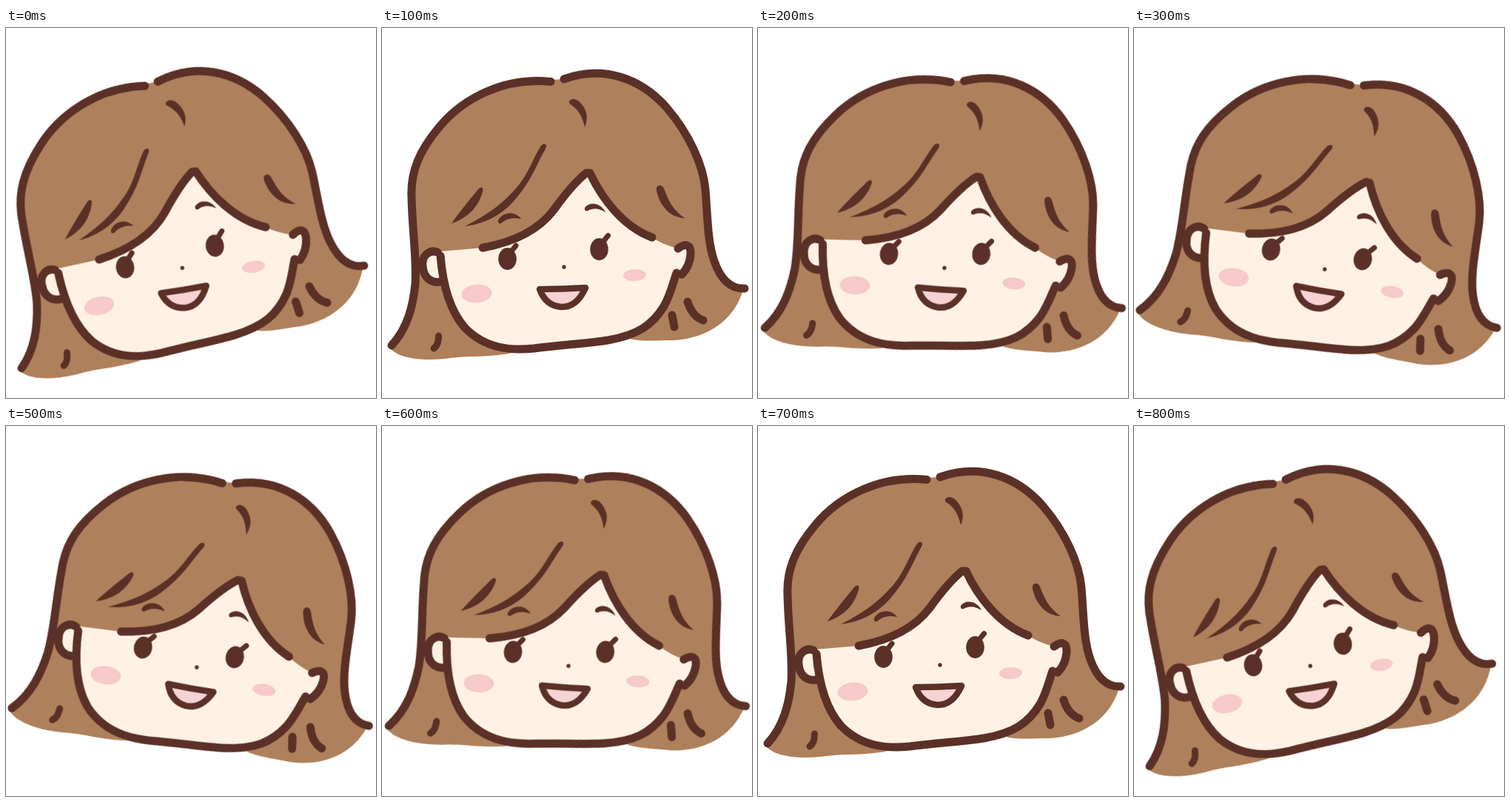
An HTML page that plays this animation: 500x500 px, repeating every 0.9 s.

```html
<!DOCTYPE html>
<html lang="en">
<head>
<meta charset="utf-8">
<title>Swaying head</title>
<style>
  html, body { margin: 0; width: 100%; height: 100%; overflow: hidden; background: #fff; }
  svg { display: block; width: 100%; height: 100%; }
  #head { transform-origin: 0 0; }
  .hair { fill: #ae805b; }
  .skin { fill: #fff2e4; }
  .blush { fill: #f7c9c8; }
  .ink { fill: #5b3027; }
  .line { fill: none; stroke: #5b3027; stroke-width: 11; stroke-linecap: round; stroke-linejoin: round; }
  .lash { stroke-width: 7; }
  .mouth { fill: #f6d2d4; stroke-width: 8.5; }
</style>
</head>
<body>
<svg viewBox="0 0 500 500">
  <g id="head">
    <path class="hair" d="M228,70 C165,66 110,95 78,133 C50,166 38,195 40,230 C41,275 47,310 45,345
      C42,375 35,405 10,432 C22,446 50,450 85,447 C115,442 150,446 180,438 L200,420 L300,400 L335,420
      C350,424 370,422 395,422 C440,419 476,395 488,354 C468,353 456,335 449,315
      C440,290 440,255 437,218 C434,185 415,143 385,108 C350,68 300,50 246,69 Z"/>

    <!-- ears and face -->
    <path class="skin" d="M77,303 C65,299 53,307 55,322 C56,337 66,345 80,343 Z"/>
    <path class="skin" d="M396,298 C411,290 418,293 417,306 C416,320 410,328 405,333 L394,333 Z"/>
    <path class="skin" d="M77,302 L136,297 C175,290 210,275 232,246 C245,228 262,207 276,196 L282,197
      C297,230 325,268 365,283 Q380,293 400,298 L398,331 C393,345 390,360 381,376 C365,402 345,415 305,422
      C280,426 245,428 205,433 C175,436 140,434 112,405 C90,380 82,345 79,308 Z"/>
    <ellipse class="blush" cx="128" cy="359" rx="20.5" ry="12.3" transform="rotate(-5 128 359)"/>
    <ellipse class="blush" cx="341.5" cy="334" rx="15.5" ry="8" transform="rotate(-2 341.5 334)"/>

    <!-- outlines -->
    <path class="line" d="M228,72.5 C165,66 110,95 78,133 C50,166 38,195 40,230 C41,275 47,310 45,345
      C42,375 35,405 13,429"/>
    <path class="line" d="M246,69 C300,50 350,68 385,108 C415,143 434,185 437,218 C440,255 440,290 449,315
      C456,335 468,353 490,352"/>
    <path class="line" d="M136,297 C175,290 210,275 232,246 C245,228 262,207 276,196 L281,196
      C297,230 325,268 365,283"/>
    <path class="line" d="M79,308 C82,345 90,380 112,405 C140,434 175,436 205,433 C245,428 280,426 305,422
      C345,415 365,402 381,376 C390,360 393,345 398,331"/>
    <path class="line" d="M75,303 C65,299 53,307 55,322 C56,337 66,345 79,343"/>
    <path class="line" d="M400,298 C411,290 418,293 417,306 C416,320 410,328 405,333"/>

    <!-- features -->
    <ellipse class="ink" cx="169.5" cy="312" rx="12.3" ry="15"/>
    <ellipse class="ink" cx="293.5" cy="299" rx="12.3" ry="15"/>
    <path class="line lash" d="M173,304 L181,294 M297,291 L305.500,280.500"/>
    <circle class="ink" cx="246" cy="323" r="2.7"/>
    <path class="ink" d="M157,260 C162,249 179,246 188,258 C177,256 169,257 161,264 Q156,265 157,260 Z"/>
    <path class="ink" d="M274,243 C280,234 296,236 302,249 C293,243 285,243 278,247 Q273,248 274,243 Z"/>
    <path class="line mouth" d="M213,353 Q244,353 275,351 C268,367 257,377 243,377 C227,376 218,367 213,353 Z"/>

    <!-- strands -->
    <path class="ink" d="M253,99 C257,93 266,96 272,106 C278,115 278,124 274,134 C271,121 267,112 256,104 Q252,102 253,99 Z"/>
    <path class="ink" d="M215,159 C220,154 224,158 221,163 C206,190 203,205 178,234 C158,256 135,265 112,268
      C145,251 165,236 185,212 C198,196 204,176 215,159 Z"/>
    <path class="ink" d="M130,218 C134,213 138,216 136,221 C131,240 118,256 94,264 C106,247 116,235 130,218 Z"/>
    <path class="ink" d="M371,216 C373,211 379,212 381,217 C387,233 393,246 409,257 C390,256 376,242 371,220 Z"/>
    <path class="line" d="M413,370 C417,383 423,391 434,395 M392,388 L395,404"/>
    <path class="line" style="stroke-width:9" d="M76.500,416 C76,425 75,429 70,433"/>
  </g>
</svg>
<script>
  // Each pose is a turn in degrees about a pivot.
  const left = [-7.5, 252, 383];
  const slightLeft = [0, 237, 380.5];
  const middle = [6, 237, 380.5];
  const slightRight = [12, 237, 380.5];
  const right = [20.3, 231, 382];
  const poses = [left, slightLeft, middle, slightRight, right, slightRight, middle, slightLeft, left];

  const turn = ([angle, x, y]) =>
    `translate(${x}px, ${y}px) rotate(${angle}deg) translate(${-x}px, ${-y}px)`;

  const keyframes = [...poses, left].map((pose, i) => ({
    offset: i / poses.length,
    transform: turn(pose),
    easing: 'steps(1, end)'
  }));

  document.getElementById('head').animate(keyframes, { duration: 900, iterations: Infinity });
</script>
</body>
</html>
```
